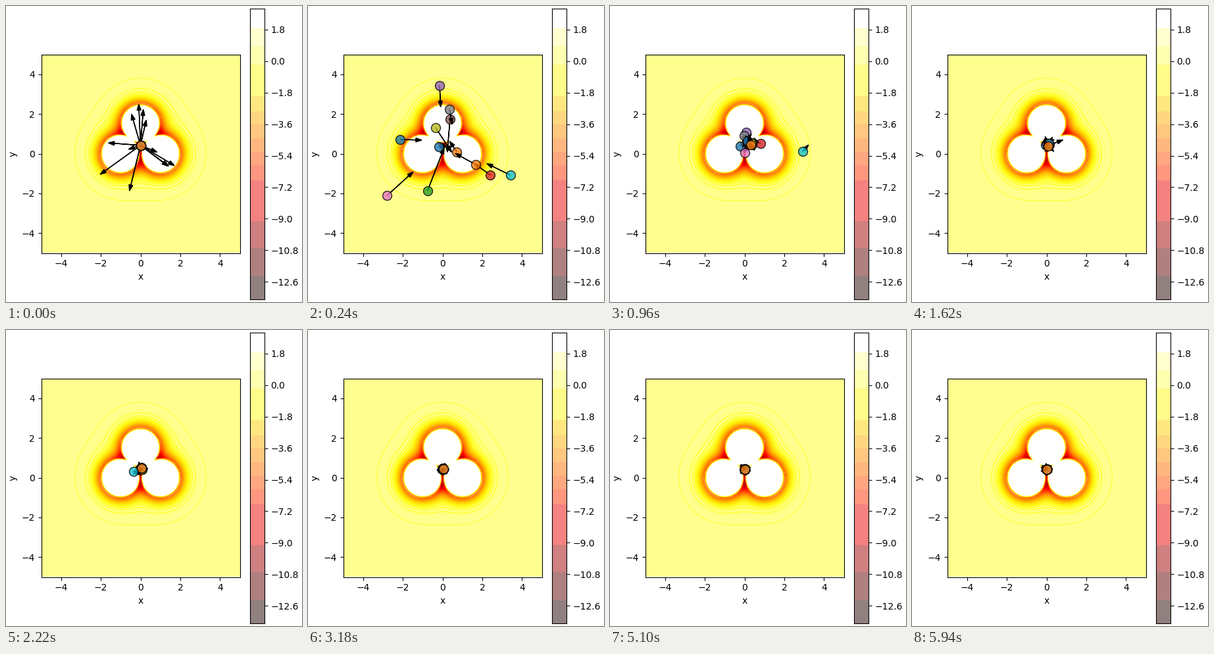
A matplotlib script that plays this animation: 450 px wide and 450 px high, repeating every 6000 ms.

```python
import numpy as np
import matplotlib.pyplot as plt
from matplotlib.animation import FuncAnimation

SIZE, DPI = 450, 100
FRAMES, INTERVAL = 100, 60
LOW, HIGH = -13.6, 3.0
DEPTH, SIGMA = 19.3, 0.92
ATOMS = [(-1, 0), (1, 0), (0, 1.5)]
CENTER = 0.42j
HEAD = 0.3
hot = plt.get_cmap("hot")

# Arrow tips of the first step, as x + iy
TIPS = np.array([-1.66 + 0.56j, 0.86 + 0.07j, -0.5 - 1.92j, 1.39 - 0.7j,
                 -0.07 + 2.52j, 0.13 + 2.25j, -2.12 - 1j, 0.3 + 1.72j,
                 -0.4 + 2.05j, 1.69 - 0.66j, -0.63 + 0.2j, 1.39 - 0.65j])
COUNT = len(TIPS)
SLOW = 9


def field(n):
    """Summed 12-6 potential of the three atoms, cut off at HIGH."""
    half = 5 - 5 / n
    axis = np.linspace(-half, half, n)
    x, y = np.meshgrid(axis, axis)
    z = 0
    for ax_, ay_ in ATOMS:
        r2 = np.maximum((x - ax_) ** 2 + (y - ay_) ** 2, 0.3)
        s = (SIGMA ** 2 / r2) ** 3
        z = z + DEPTH * (s * s - s)
    return x, y, np.clip(z, LOW, HIGH)


def scale(z):
    return (z - LOW) / (HIGH - LOW)


def place(left, top, right, bottom):
    return [left / SIZE, 1 - bottom / SIZE, (right - left) / SIZE, (bottom - top) / SIZE]


def bar_colors(n):
    """Half-transparent colour ramp, stepped into coarse bands."""
    rgb = np.ceil(255 * (0.5 + 0.5 * hot(np.linspace(0, 1, n))[:, :3]))
    keys = rgb.astype(int) // [32, 16, 32]
    bands, band = np.unique(keys, axis=0, return_inverse=True)
    band = band.ravel()
    for i, key in enumerate(bands):
        rgb[band == i] = 255 if key[2] == 7 else rgb[band == i].mean(axis=0)
    return rgb / 255


def fade(n, span):
    return 1 / (1 + (n / span) ** 4)


def swarm_paths():
    """Damped, slowly turning swings around the optimum with random scatter."""
    rng = np.random.default_rng(11)
    freq = rng.uniform(0.48, 0.66, COUNT)
    spin = rng.uniform(-0.05, 0.05, COUNT)
    span = rng.uniform(8, 10, COUNT)
    freq[SLOW], spin[SLOW], span[SLOW] = 0.465, 0.025, 22

    n = np.arange(FRAMES + 1)[:, None]
    launch = TIPS - CENTER
    launch = launch * (1 - (HEAD + 0.03) / abs(launch))
    swing = launch / np.sin(freq) * np.sin(freq * n) * np.exp(1j * spin * n)
    noise = rng.normal(0, 0.5, (2, FRAMES + 1, COUNT))
    scatter = (0.8 + 0.5j + noise[0] + 1j * noise[1]) * (n / 9) ** 2
    return CENTER + swing * fade(n, span) + scatter * fade(n, 9)


paths = swarm_paths()

fig = plt.figure(figsize=(SIZE / DPI, SIZE / DPI), dpi=DPI, facecolor="white")
ax = fig.add_axes(place(53.5, 73.5, 355.5, 375.5))
z = field(302)[2]
layer = np.floor(z / 0.2) * 0.2 + 0.1
ax.imshow(1 - 0.6 * (1 - hot(scale(layer))[..., :3]), origin="lower",
          extent=(-5, 5, -5, 5), interpolation="nearest", aspect="auto")
ax.contour(*field(200), levels=np.arange(LOW + 0.015, HIGH, 0.3), cmap="hot",
           vmin=LOW, vmax=HIGH, linewidths=1)

bar = fig.add_axes(place(370.5, 3.9, 392.5, 445.9))
bar.imshow(bar_colors(442)[:, None], origin="lower", extent=(0, 1, LOW, HIGH),
           interpolation="nearest", aspect="auto")
bar.set_xticks([])
bar.set_yticks(np.arange(-7, 2) * 1.8)
bar.yaxis.tick_right()

# Each particle's arrow lies under its own dot but over the earlier dots
arrows, dots = [], []
for k in range(COUNT):
    arrows.append(ax.arrow(0, 0, 1, 1, head_width=0.2, head_length=HEAD,
                           fc="k", ec="k", zorder=3))
    dots += ax.plot([0], [0], "o", ms=10, mfc=f"C{k % 10}", mec="k",
                    alpha=0.8, zorder=3)
ax.set(xlim=(-5, 5), ylim=(-5, 5), xlabel="x", ylabel="y",
       xticks=range(-4, 5, 2), yticks=range(-4, 5, 2))


def update(n):
    for arrow, dot, p, q in zip(arrows, dots, paths[n], paths[n + 1]):
        v = q - p
        dot.set_data([p.real], [p.imag])
        arrow.set_data(x=p.real, y=p.imag, dx=v.real, dy=v.imag)
    return arrows + dots


anim = FuncAnimation(fig, update, frames=FRAMES, interval=INTERVAL,
                     repeat=True, repeat_delay=0)
plt.show()
```
